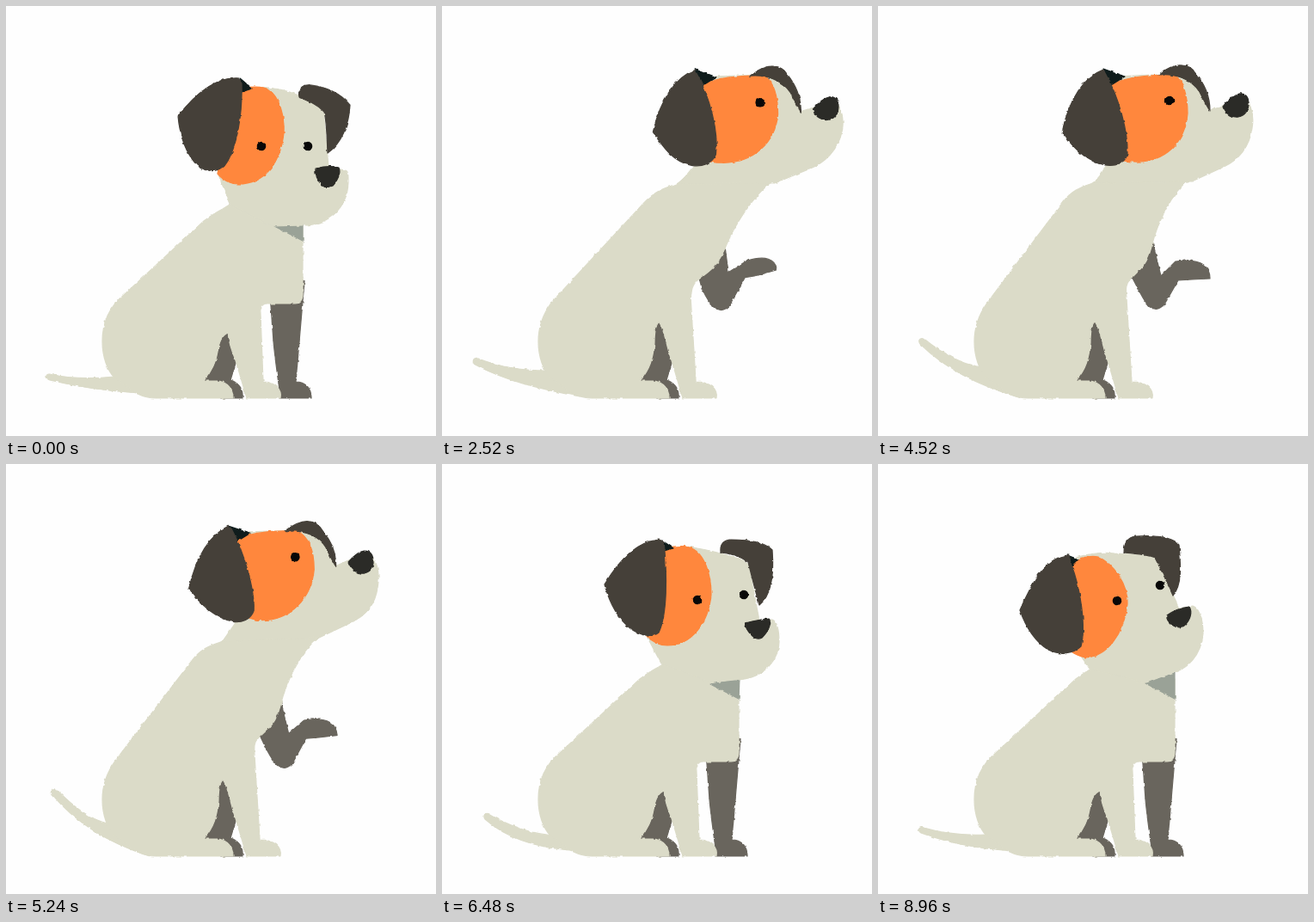
Animation of 500 by 500 pixels, one loop 9000 ms. Source, as an HTML page:

```html
<!DOCTYPE html>
<html lang="en">
<head>
<meta charset="utf-8">
<title>Sitting dog</title>
<style>
  html, body { margin: 0; width: 100%; height: 100%; overflow: hidden; background: #fefefe; }
  svg { display: block; width: 100%; height: 100%; }
</style>
</head>
<body>
<svg id="stage" viewBox="0 0 500 500">
  <filter id="rough" x="0" y="0" width="500" height="500" filterUnits="userSpaceOnUse" color-interpolation-filters="sRGB">
    <feTurbulence type="fractalNoise" baseFrequency=".16" numOctaves="2" seed="4"/>
    <feDisplacementMap in="SourceGraphic" scale="3" xChannelSelector="R" yChannelSelector="G"/>
  </filter>
  <g id="dog" filter="url(#rough)" stroke-width="1.2" stroke-linejoin="round"></g>
</svg>
<script>
const LOOP = 9000;
const FUR = '#dbdbc8', EAR = '#454039', SHADE = '#69655d';
const PAINT = {
  leg: SHADE, rear: SHADE, tail: FUR, body: FUR, collar: '#9aa297', head: FUR,
  patch: '#ff873d', eyeL: '#080808', eyeR: '#080808', far: EAR, nose: '#2b2b27',
  inner: '#0f1c1c', ear: EAR
};

function eye(x, y, r = 4.7) {
  const k = r * .55;
  return `M${x - r} ${y}C${x - r} ${y - k} ${x - k} ${y - r} ${x} ${y - r}` +
    `C${x + k} ${y - r} ${x + r} ${y - k} ${x + r} ${y}` +
    `C${x + r} ${y + k} ${x + k} ${y + r} ${x} ${y + r}` +
    `C${x - k} ${y + r} ${x - r} ${y + k} ${x - r} ${y}Z`;
}

const FOOT = 'M264 456C264 446 258 437 246 436L230 436';
const RUMP = 'C112 408 118 424 126 432C140 440 150 456 175 456Z';

// Parts ending in "2" are the other extreme of a wagging part.
const level = {
  leg: 'M307 335L311 390C313 412 316 430 317 440L318 448L318 456L355 456C355 444 348 437 337 437L341 390L347 320Z',
  rear: 'M228 440L240 390L252 360L270 400L268 412L261 435C271 438 276 446 275 456L250 456Z',
  tail: 'M126 431C100 434 75 435 50 430C45 430 46 436 51 437C90 445 120 448 155 450L175 440Z',
  tail2: 'M122 431C95 428 70 416 55 406C49 404 48 409 50 412C75 435 110 446 150 449L175 440Z',
  body: FOOT + 'C238 426 244 416 246 402C248 388 253 382 258 380C259 390 262 400 267 412L280 456L319 456C321 446 313 437 299 437L296 358C295 350 298 347 302 346L334 346C341 346 345 342 345 336C345 310 345 280 345 250L300 225L262 230C258 232 255 234 252 236C246 239 238 244 230 250L137 336C120 350 112 368 112 390' + RUMP,
  collar: 'M312 256L345 254L345 273Z',
  head: 'M262 232L246 195L270 98C285 94 300 94 312 96C330 98 350 108 363 116C369 120 370 125 370 132L375 187L394 191C398 191 398 196 398 205C397 235 375 255 345 255L310 256Z',
  patch: 'M268 98C283 93 298 93 305 97C319 106 324 130 323 148C320 180 302 207 270 207C262 207 252 203 246 195Z',
  eyeL: eye(297, 163), eyeR: eye(351, 163),
  far: 'M340 106C338 96 346 91 354 92C372 94 388 100 400 115C399 138 390 160 374 171C373 150 373 135 370 123C362 114 350 110 340 106Z',
  nose: 'M360 189C372 186 380 186 387 188C390 194 385 204 380 209C375 211 370 211 367 208C362 203 359 195 360 189Z',
  inner: 'M272 84L286 96L274 100Z',
  ear: 'M270 84C245 82 222 100 200 128C202 150 208 170 222 185C232 193 245 194 254 186C270 165 275 120 274 90Z'
};
const tilted = {
  ...level,
  collar: 'M312 256L346 250L345 273Z',
  head: 'M255 232L238 200L258 98C275 95 288 96 297 98C315 101 332 106 345 110C353 113 355 114 357 120L369 182L384 181C390 183 392 195 392 208C390 232 370 251 340 251L312 254Z',
  patch: 'M256 99C270 95 280 95 288 97C306 103 313 130 313 152C310 185 290 211 262 211C252 211 244 206 238 200Z',
  eyeL: eye(297, 158), eyeR: eye(351, 152),
  far: 'M324 103C323 93 328 88 336 88C352 88 375 90 384 100C386 125 384 152 369 164C365 150 360 130 356 114C348 108 335 104 324 103Z',
  nose: 'M353 185C362 182 372 181 380 180C384 184 380 194 372 202C368 204 364 203 361 200C356 195 352 190 353 185Z',
  inner: 'M256 89L269 98L258 101Z',
  ear: 'M252 88C228 90 208 108 189 140C193 155 202 178 220 192C232 200 245 202 252 196C262 175 262 130 258 90Z'
};
const back = {
  ...level,
  collar: 'M315 257L345 248L345 273Z',
  head: 'M249 238L236 215L235 106C255 102 265 102 275 103C295 106 315 108 326 109C335 111 337 111 339 116L361 180L374 175C382 177 385 190 385 202C383 228 365 246 340 250L315 256Z',
  patch: 'M235 112C242 106 252 104 260 106C284 110 301 138 301 165C298 200 278 226 252 226C244 226 238 221 233 214Z',
  eyeL: eye(288, 164), eyeR: eye(340, 151),
  far: 'M303 103C302 94 308 90 316 89C335 88 356 90 366 97C367 120 367 148 355 160C352 152 346 130 337 111C330 107 315 105 303 103Z',
  nose: 'M344 186C352 182 362 180 371 179C374 184 370 195 364 201C360 204 355 203 352 200C347 195 343 190 344 186Z',
  inner: 'M235 102L245 107L238 116Z',
  ear: 'M236 102C208 106 192 128 175 163C182 185 192 202 210 213C222 218 236 217 243 208C249 185 246 140 238 108Z'
};
const rest = {
  ...level,
  collar: 'M311 255L345 242L345 273Z',
  head: 'M246 238L235 222L222 112C240 104 262 102 275 104C290 104 302 105 313 107C321 109 323 110 325 115L350 168L366 165C374 168 378 182 378 197C376 222 360 240 338 244L312 254Z',
  patch: 'M222 115C235 109 248 106 256 108C274 116 291 140 290 163C286 198 266 224 242 225C235 224 230 221 226 219Z',
  eyeL: eye(278, 159), eyeR: eye(328, 141),
  far: 'M286 103C286 92 290 85 300 84C318 83 342 84 350 94C352 118 354 140 343 153C338 142 332 128 322 109C312 105 298 104 286 103Z',
  nose: 'M336 176C344 170 353 167 362 166C366 172 363 182 356 188C352 191 346 190 342 187C338 184 335 180 336 176Z',
  inner: 'M220 106L233 111L224 120Z',
  ear: 'M222 106C196 108 182 132 165 170C172 190 182 206 198 216C212 223 228 220 236 212C242 190 236 145 224 115Z'
};
const forward = {
  ...level,
  leg: 'M302 340L295 404C299 418 303 430 308 432L322 441L330 450L343 455C343 445 343 438 330 429L316 390L340 335Z',
  body: FOOT + 'C238 426 244 416 246 402C248 390 253 386 258 383C259 392 262 402 267 412L280 456L319 456C321 446 313 437 299 437L296 362C295 355 298 351 303 351L334 352C342 351 346 347 347 340C349 315 351 285 351 255L310 225L280 229C274 230 268 232 262 235C256 238 250 242 244 247L137 336C120 350 112 368 112 390' + RUMP,
  collar: 'M336 262L351 264L351 271Z',
  head: 'M280 232L275 212L300 100C315 101 330 102 342 104C360 113 378 122 392 128C398 131 398 135 399 142L401 203L420 204C423 205 422 210 422 220C420 248 400 266 370 266L338 263Z',
  patch: 'M300 101C315 100 330 101 340 106C352 116 356 135 356 155C353 190 332 218 300 218C288 218 276 212 270 200Z',
  eyeL: eye(337, 174), eyeR: eye(391, 177),
  far: 'M368 116C368 108 374 104 382 104C400 106 418 116 428 130C425 152 416 174 401 184C400 165 400 150 398 134C390 126 380 121 368 116Z',
  nose: 'M387 211C398 209 406 209 414 211C417 217 412 226 407 231C402 233 397 233 394 230C389 225 386 217 387 211Z',
  inner: 'M303 93L313 101L305 106Z',
  ear: 'M305 93C280 92 255 105 230 133C234 158 242 180 255 194C264 201 275 202 284 195C300 175 306 130 306 98Z'
};
const beg = {
  ...level,
  leg: 'M290 305L300 325C312 345 322 358 335 346L349 309L362 306L385 297C380 284 365 282 348 290L328 305L315 270Z',
  leg2: 'M290 305L303 330C311 345 318 361 333 347L349 319L365 318L386 317C386 305 380 293 346 297L329 314L318 270Z',
  tail: 'M121 424C95 424 65 420 40 410C34 410 34 416 38 418C70 435 110 445 160 454L175 440Z',
  tail2: 'M120 418C98 413 80 398 60 377C54 374 52 378 54 382C78 412 112 438 167 456L175 440Z',
  body: FOOT + 'C242 422 245 410 247 392C247 378 248 370 252 367C258 372 262 400 267 412L280 456L319 456C321 446 313 437 295 437L289 340C288 328 288 323 293 318L303 308C310 302 315 292 318 280C324 255 340 218 363 200L340 175L265 186C258 198 254 205 247 207C235 211 225 215 215 228L127 345C115 362 112 378 112 390' + RUMP,
  collar: 'M345 200L350 196L348 198Z',
  head: 'M250 206L265 185L262 80C285 78 310 77 340 77C352 77 358 80 362 85C370 92 378 103 382 118L402 108L424 105C432 115 433 130 431 142C428 165 415 176 400 183L363 201Z',
  patch: 'M262 88C285 79 312 76 338 78C350 84 357 98 357 122C354 155 330 181 296 181C288 181 284 179 280 178Z',
  eyeL: eye(335, 107), eyeR: eye(376, 98, 0),
  far: 'M322 77C332 70 342 65 350 66C358 66 363 72 366 77C374 86 382 100 382 118C378 112 374 104 370 96C360 80 340 76 322 77Z',
  nose: 'M397 112C402 106 408 100 415 99C422 98 426 103 426 110C427 118 422 124 415 125C408 126 401 122 397 112Z',
  inner: 'M257 72L282 80L266 90Z',
  ear: 'M256 72C236 82 220 105 211 145C224 163 240 178 262 183C273 185 284 180 287 170C288 145 274 100 260 75Z'
};
const begLow = {
  ...beg,
  head: 'M250 206L268 188L266 82C290 82 315 80 345 79C355 79 362 82 366 87C374 95 382 106 386 122L405 114L427 106C436 118 437 130 435 142C432 165 418 180 402 187L365 204Z',
  patch: 'M268 92C290 82 315 80 345 80C355 88 360 103 360 125C357 158 335 182 298 181C293 181 288 180 284 180Z',
  eyeL: eye(339, 110),
  far: 'M326 80C336 72 346 68 354 69C361 69 366 73 368 77C378 88 386 104 386 122C382 116 378 108 374 100C364 84 344 78 326 80Z',
  nose: 'M401 117C406 110 412 104 420 102C427 101 431 106 431 113C431 122 426 128 419 129C412 130 404 126 401 117Z',
  inner: 'M262 73L287 82L271 92Z',
  ear: 'M262 74C240 82 222 108 214 147C227 165 243 182 264 185C277 187 288 182 290 172C291 147 280 105 264 78Z'
};

const smooth = p => p * p * (3 - 2 * p);
const linear = p => p;
const easeOut = p => 1 - (1 - p) ** 3;
const slowStart = p => smooth(p * p);

// time, value, easing towards the next key
const poseKeys = [
  [0, level, slowStart], [1850, tilted, linear], [1940, tilted, smooth], [2200, forward, smooth],
  [2560, begLow, smooth], [2800, begLow, smooth], [3200, beg, smooth], [3720, begLow, linear],
  [4660, begLow, smooth], [5200, beg, smooth], [5680, forward, easeOut], [6480, tilted, linear],
  [7360, back, p => 1 - (1 - p) ** 2], [8320, rest, linear], [LOOP, rest, linear]
];
const leanKeys = [
  [0, 0, linear], [1960, 0, smooth], [2360, 44, smooth], [2800, 0, linear],
  [5200, 0, smooth], [5520, 30, smooth], [5680, 0, linear], [LOOP, 0, linear]
];

const NUMBER = /-?\d+(\.\d+)?/g;
const cache = new Map();
function numbers(path) {
  if (!cache.has(path)) cache.set(path, path.match(NUMBER).map(Number));
  return cache.get(path);
}
const mix = (a, b, p) => a + (b - a) * p;
const mixAll = (a, b, p) => a.map((v, i) => mix(v, b[i], p));

function locate(keys, t) {
  const i = keys.findIndex((key, n) => t < keys[n + 1][0]);
  const [start, from, ease] = keys[i], [end, to] = keys[i + 1];
  return [from, to, ease((t - start) / (end - start))];
}

// Lean the upper part of the dog forward.
const leanAll = (points, amount) => points.map((v, i) => i % 2 ? v
  : v + amount * Math.min(1, Math.max(0, (340 - points[i + 1]) / 180)));

const wave = (t, low, period) => .5 - .5 * Math.cos((t - low) / period * 2 * Math.PI);

const dog = document.getElementById('dog');
const shapes = Object.entries(PAINT).map(([name, color]) => {
  const node = document.createElementNS('http://www.w3.org/2000/svg', 'path');
  node.setAttribute('fill', color);
  node.setAttribute('stroke', color);
  dog.append(node);
  return { name, node };
});

function draw(t) {
  const [from, to, p] = locate(poseKeys, t);
  const lean = mix(...locate(leanKeys, t));
  const wag = {
    tail: wave(t, t < 2400 ? 290 : 260, 320),
    leg: wave(t, 3240, 853)
  };
  const points = (pose, name) => {
    const first = numbers(pose[name]), other = pose[name + '2'];
    return other ? mixAll(first, numbers(other), wag[name]) : first;
  };
  for (const { name, node } of shapes) {
    const outline = leanAll(mixAll(points(from, name), points(to, name), p), lean);
    let i = 0;
    node.setAttribute('d', level[name].replace(NUMBER, () => outline[i++].toFixed(2)));
  }
}

const start = performance.now();
function tick() {
  const t = (performance.now() - start) % LOOP;
  draw(Math.floor(t / 40) * 40);
  requestAnimationFrame(tick);
}
tick();
</script>
</body>
</html>
```
